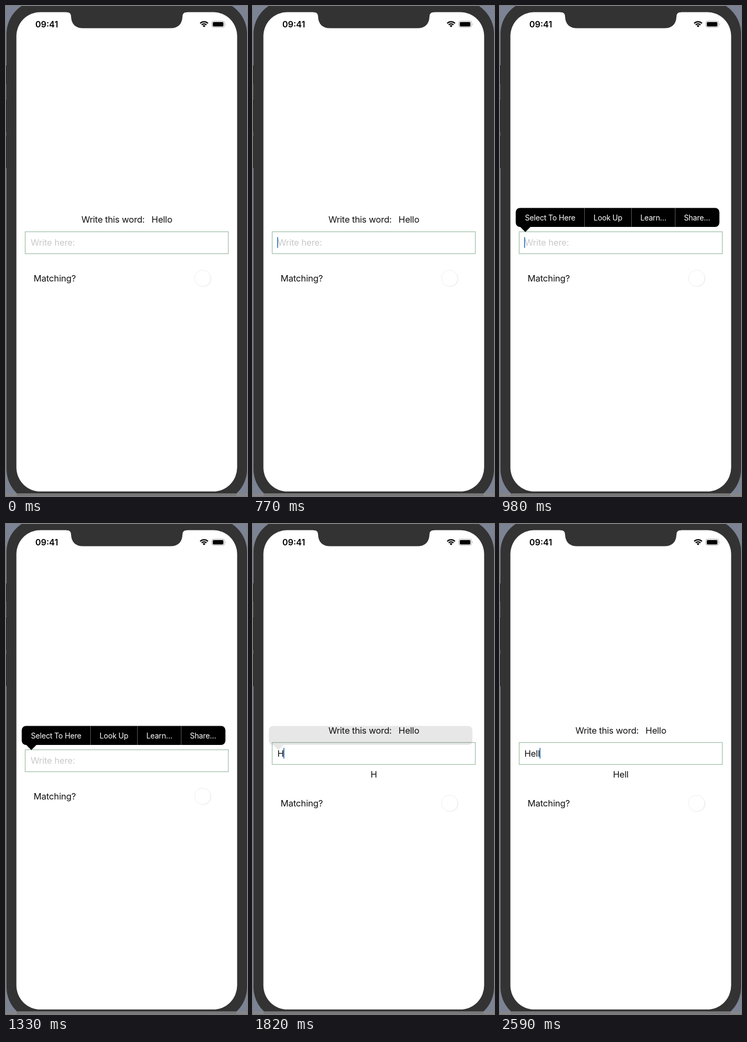
Recreate the animation shown at these times as an HTML page. Size 452 px wide and 916 px high, loop 3010 ms.

```html
<!DOCTYPE html>
<html lang="en">
<head>
<meta charset="utf-8">
<title>Word matching</title>
<style>
  html, body { margin: 0; width: 100%; height: 100%; overflow: hidden; background: #7b8394; }
  svg { display: block; width: 100vw; height: 100vh; }
  text { font: 16.5px Inter, Roboto, sans-serif; letter-spacing: -0.2px; fill: #111; white-space: pre; }
  .clock { font-weight: 600; font-size: 16px; letter-spacing: 0; fill: #000; }
  .mid { text-anchor: middle; }
  #hint { fill: #c9c9cb; }
  #menu text { font-size: 14px; fill: #fff; text-anchor: middle; }
</style>
</head>
<body>
<svg viewBox="0 0 452 916">
  <!-- phone body -->
  <rect width="452" height="916" fill="#7b8394"/>
  <rect y="911" width="452" height="5" fill="#85868a"/>
  <rect x="1" y="-10" width="451" height="938" rx="62" fill="#333"/>
  <rect x="20" y="911" width="412" height="5" fill="#777"/>
  <path d="M.5 111v34M.5 174v61M.5 243v60" stroke="#292929"/>
  <path d="M.5 145v28M.5 235v8" stroke="#555"/>
  <rect x="19.5" y="11.4" width="414" height="896.2" rx="45" fill="#fff"/>
  <path d="M113 10v1.400q9 0 9 8q1 22 23 22h163q22 0 23-22q0-8 9-8v-1.400z" fill="#333"/>

  <!-- status bar -->
  <text class="clock" x="54.9" y="40">09:41</text>
  <g fill="none" stroke="#000" stroke-width="2.3">
    <path d="M364.200 32.500a10.300 10.300 0 0 1 14.600 0"/>
    <path d="M367 35.300a6.400 6.400 0 0 1 9 0"/>
  </g>
  <path d="M371.500 39.800l-2.600-2.700a3.700 3.700 0 0 1 5.200 0z"/>
  <rect x="386" y="28.3" width="24" height="11.4" rx="3.3" fill="none" stroke="#a6a6a6"/>
  <rect x="387.8" y="29.9" width="20" height="8.3" rx="1.8"/>
  <path d="M411.300 32.200q1.500 1.900 0 3.800z" fill="#a6a6a6"/>

  <g id="upper">
    <text x="141.4" y="405">Write this word:</text>
    <text x="273.1" y="405">Hello</text>
    <rect x="36" y="422" width="381" height="41" fill="none" stroke="#a0c0a8" stroke-width="1.3"/>
    <text id="hint" x="46.3" y="448">Write here:</text>
    <text id="typed" x="45.7" y="448"></text>
    <rect id="caret" x="45.3" y="432" width="1.8" height="20" rx=".6" fill="#3478be"/>
  </g>
  <text id="echo" class="mid" x="226.5" y="474"></text>
  <g id="lower">
    <text x="51.8" y="515">Matching?</text>
    <circle cx="370.2" cy="510" r="15.2" fill="#f3f3f3"/>
    <circle cx="368.7" cy="509" r="15.2" fill="#fff" stroke="#ededed" stroke-width=".9"/>
  </g>

  <g id="menu">
    <path d="M37.500 377.500H403.500a8 8 0 0 1 8 8v19.500a8 8 0 0 1-8 8H57l-9.500 9.500l-9.500-9.500h-.5a8 8 0 0 1-8-8v-19.500a8 8 0 0 1 8-8z"/>
    <g id="items">
      <path d="M158.500 378v35M246.500 378v35M328.500 378v35" stroke="#5c5c5c"/>
      <text x="94" y="401">Select To Here</text>
      <text x="202.5" y="401">Look Up</text>
      <text x="287.5" y="401">Learn…</text>
      <text x="369.5" y="401">Share…</text>
    </g>
  </g>
</svg>
<script>
const LOOP = 3010;

// [start ms, value]; each value holds until the next start
const caretFade = [[0, 0], [350, .6], [490, 1], [1190, .65], [1260, .3], [1330, 0],
                   [1610, .3], [1680, .65], [1750, .9], [1820, 1]];
const menuFade = [[0, 0], [840, .35], [910, .8], [980, 1], [1680, .83], [1750, .45], [1820, .09], [1890, 0]];
const letters = [[0, 0], [1610, 1], [2100, 2], [2450, 3], [2590, 4]];
const caretX = [45.3, 57, 66.2, 70.2, 74.1];

const $ = id => document.getElementById(id);
const at = (steps, t) => steps.filter(s => s[0] <= t).pop()[1];
const shift = (el, y) => el.setAttribute("transform", `translate(0 ${y})`);

function draw(t) {
  const count = at(letters, t);
  const word = "Hello".slice(0, count);
  const menu = at(menuFade, t);

  shift($("upper"), count ? -13.5 : 0);
  shift($("lower"), count ? 13 : 0);
  $("hint").style.opacity = count ? 0 : 1;
  $("typed").textContent = $("echo").textContent = word;
  $("caret").setAttribute("x", caretX[count]);
  $("caret").style.opacity = at(caretFade, t);
  $("menu").style.opacity = menu;
  $("items").style.opacity = menu > .2 ? 1 : 0;
}

const begin = performance.now();
function tick() {
  draw((performance.now() - begin) % LOOP);
  requestAnimationFrame(tick);
}
tick();
</script>
</body>
</html>
```
